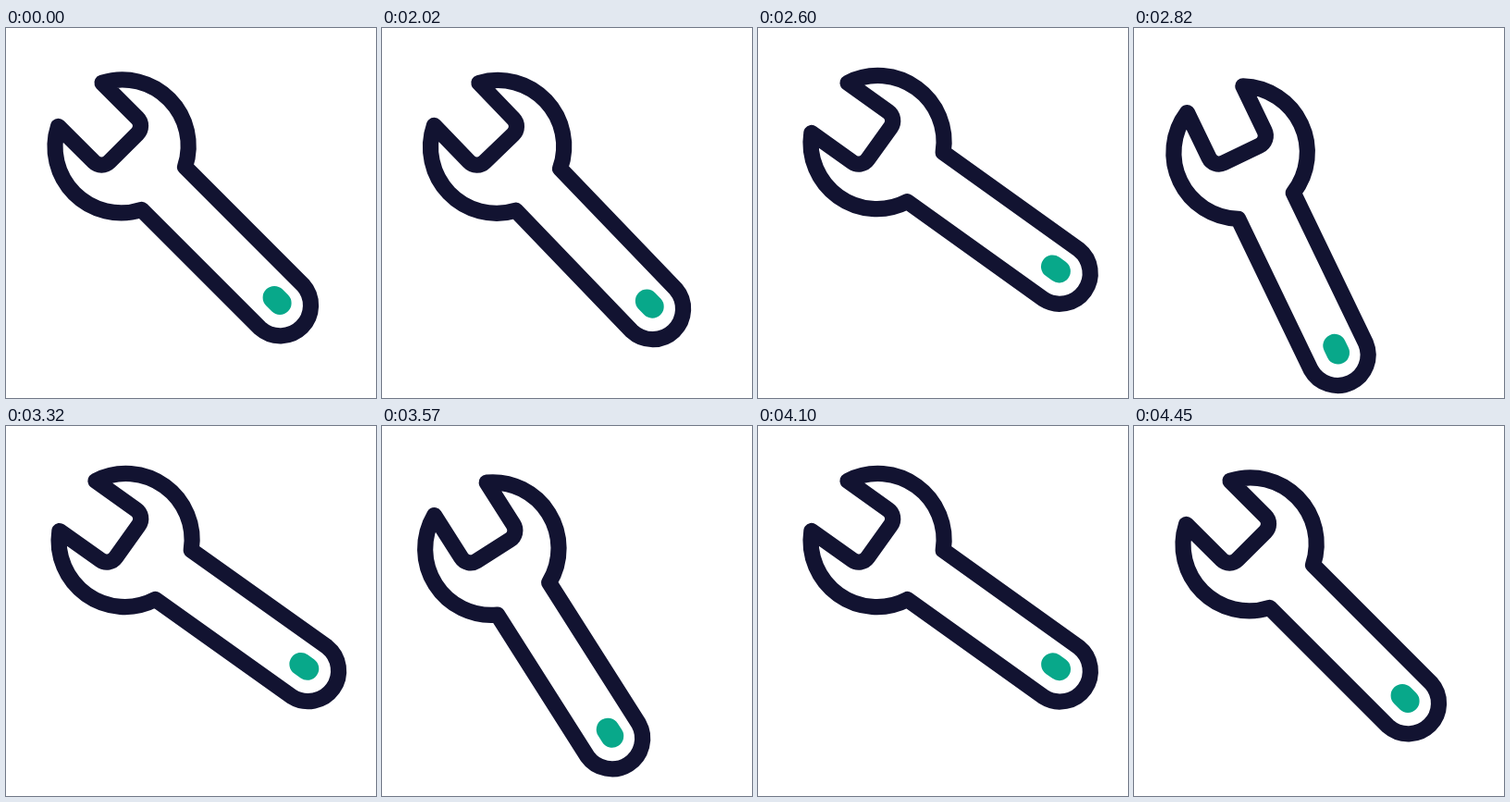
These frames come from a looping animation (400 px wide and 400 px high, 4.47 s). An HTML page:

```html
<!DOCTYPE html>
<html lang="en">
<head>
<meta charset="utf-8">
<title>Swinging wrench</title>
<style>
  html, body { margin: 0; width: 100%; height: 100%; overflow: hidden; background: #fff; }
  svg { display: block; width: 100%; height: 100%; }
  path { fill: none; stroke-linecap: round; stroke-linejoin: round; }
</style>
</head>
<body>
<svg viewBox="0 0 400 400">
  <g id="wrench">
    <path stroke="#121331" stroke-width="17.2" d="M103.5 58.5 L141.5 96.5 A12 12 0 0 1 141.5 113.5
      L111.3 143.7 A12 12 0 0 1 94.3 143.7 L56 105.5 A71.5 71.5 0 0 0 146 195.6
      L274 323.6 A33 33 0 0 0 320.6 277 L193 149.4 A71.5 71.5 0 0 0 103.5 58.5 Z"/>
    <path stroke="#08a88a" stroke-width="25" d="M289.6 290.6 l6 6"/>
  </g>
</svg>
<script>
  const LOOP = 4470;
  const STEP = 25;
  const LOW = -10, HIGH = 22;
  const wrench = document.getElementById('wrench');

  // Turning points of the swing; bend < 1 makes the move towards one start faster.
  const swing = [
    { time: 2000, angle: 0 },
    { time: 2131, angle: HIGH, bend: 1.2 },
    { time: 2589, angle: LOW, bend: 0.75 },
    { time: 2896, angle: HIGH, bend: 0.75 },
    { time: 3370, angle: LOW, bend: 0.75 },
    { time: 3741, angle: HIGH, bend: 0.75 },
    { time: 4041, angle: LOW, bend: 0.75 },
    { time: 4450, angle: 0, bend: 1 }
  ];

  const smooth = u => u * u * (3 - 2 * u);

  function angleAt(time) {
    const next = swing.findIndex(point => point.time > time);
    if (next < 1) return 0;
    const from = swing[next - 1], to = swing[next];
    const progress = (time - from.time) / (to.time - from.time);
    return from.angle + (to.angle - from.angle) * smooth(progress ** to.bend);
  }

  function draw() {
    const time = Math.floor((performance.now() % LOOP + 5) / STEP) * STEP;
    wrench.setAttribute('transform', `translate(0.5 0.8) rotate(${angleAt(time).toFixed(3)} 100 101)`);
    requestAnimationFrame(draw);
  }
  draw();
</script>
</body>
</html>
```
